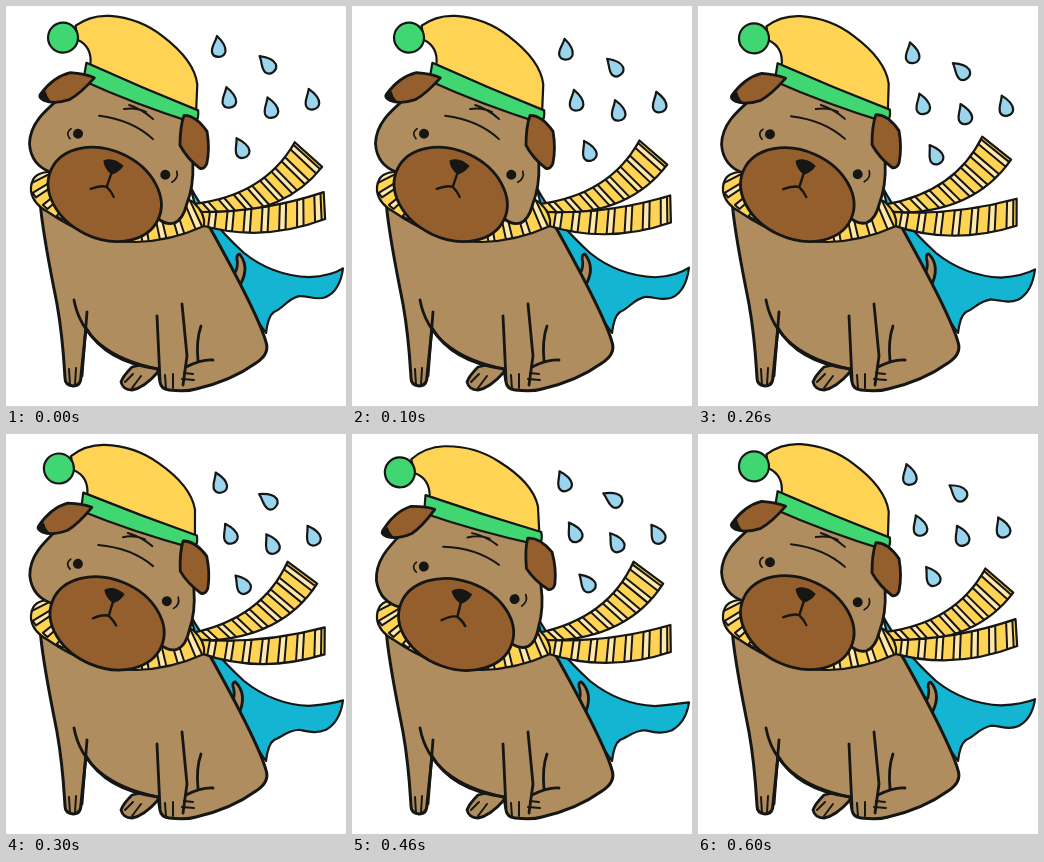
An HTML page with a canvas for the animation above (700 ms loop, 340 by 400 pixels).

```html
<!DOCTYPE html>
<html lang="en">
<head>
<meta charset="utf-8">
<title>Dog in the wind</title>
<style>
html, body { margin: 0; width: 100%; height: 100%; overflow: hidden; background: #fff; }
canvas { display: block; }
</style>
</head>
<body>
<canvas id="stage" width="340" height="400"></canvas>
<script>
const ctx = document.getElementById('stage').getContext('2d');
const INK = '#161614', FUR = '#b08d5e', BROWN = '#945f2d', YELLOW = '#ffd454',
  PALE = '#ffe8ac', GREEN = '#40d672', TEAL = '#14b5d2', WATER = '#9ad5ed';
const STEP = 100, STEPS = 7;

// Mean centre and tilt of each raindrop
const drops = [
  [213, 46.7, -9], [263, 63.6, -45], [223.5, 97.6, -14],
  [265.5, 107.7, -18], [306.5, 99.4, -17], [236.5, 147.9, -27]
];

// Swings between -1 and 1 once per loop, highest at the given step
const wave = (i, peak) => Math.cos((i - peak) * 2 * Math.PI / STEPS);

// Rises from 0 to 1 and back, slow at the bottom and quick at the peak
function nod(i, peak) {
  const gap = Math.abs(i - peak), near = Math.min(gap, STEPS - gap);
  return (1 - near / 3) ** 2;
}

function shape(d, fill, width = 2.8) {
  const path = new Path2D(d);
  if (fill) {
    ctx.fillStyle = fill;
    ctx.fill(path);
  }
  ctx.lineWidth = width;
  if (width) ctx.stroke(path);
}

function dot(x, y, r, fill, width = 0) {
  shape(`M${x - r} ${y}a${r} ${r} 0 1 0 ${2 * r} 0a${r} ${r} 0 1 0 ${-2 * r} 0Z`, fill, width);
}

function turned(deg, x, y, draw) {
  ctx.save();
  ctx.translate(x, y);
  ctx.rotate(deg * Math.PI / 180);
  ctx.translate(-x, -y);
  draw();
  ctx.restore();
}

// Point on a quadratic curve [x0, y0, cx, cy, x1, y1]
function at(c, t) {
  const u = 1 - t;
  return [0, 1].map(i => u * u * c[i] + 2 * u * t * c[i + 2] + t * t * c[i + 4]);
}

function stripes(a, b, count) {
  for (let k = 0; k < count; k++) {
    const t = (k + 0.45) / count, end = t + 0.36 / count;
    shape(`M${at(a, t)}L${at(b, t)}L${at(b, end)}L${at(a, end)}Z`, PALE, 2);
  }
}

function knit(outline, bands) {
  shape(outline, YELLOW, 0);
  ctx.save();
  ctx.clip(new Path2D(outline));
  for (const [a, b, count] of bands) stripes(a, b, count);
  ctx.restore();
  shape(outline, null, 2.2);
}

function scarfEnd(a, b, count) {
  const [x0, y0, cx, cy, x1, y1] = b;
  knit(`M${a[0]} ${a[1]}Q${a.slice(2)}L${x1} ${y1}Q${cx} ${cy} ${x0} ${y0}Z`, [[a, b, count]]);
}

function cape(i) {
  const y = 265 + 3.5 * wave(i, 4.3), s = 0.6 + 0.45 * wave(i, 3.7);
  shape(`M184 180C195 202 215 226 238 247C258 263 280 ${270 + s} 303 ${271 + s}
    Q325 270 337 ${y}Q334 ${284 + 4 * s} 320 ${290 + 6 * s}
    C310 ${294 + 6 * s} 303 ${288 + 10 * s} 293 ${289 + 7 * s}
    C280 ${293 + 4 * s} 278 302 268 306Q262 310 260 327L200 240Z`, TEAL, 2.2);
}

function tail(i) {
  turned(-1 - 4 * wave(i, 3.5), 228, 282, () =>
    shape('M216 272Q231 272 230 256Q228 248 232 248Q244 262 232 282Z', FUR));
}

function body() {
  shape('M126 361Q117 370 115 376Q117 384 126 384Q138 382 152 366L152 355Z', FUR);
  shape(`M34 194C36 225 44 262 51 298C57 332 58 356 59 372Q59 379 67 380Q75 380 75 370
    L80 322Q100 356 152 363L154 376Q155 383 163 384Q180 386 190 383
    Q225 375 250 357Q264 348 260 336Q252 308 203 220L120 190Z`, FUR, 3);
  shape(`M68 294Q78 348 152 363M81 306L76 370M151 310L154 374M176 298Q179 328 181 350L177 379
    M195 320Q190 334 192 355M207 354Q196 353 180 361`);
  shape(`M63 363L64 379M70 362L69 379M159 369L160 383M167 368L167 382
    M119 376L127 368M126 382L135 370M178 367L187 368M176 373L188 374`, null, 2);
}

function neckScarf() {
  knit(`M42 166Q24 167 25 185Q27 198 42 206Q85 236 130 236Q165 235 198 220
    Q200 208 187 196L120 160Z`, [
    [[18, 168, 30, 216, 128, 242], [62, 150, 72, 182, 120, 190], 7],
    [[112, 242, 155, 244, 202, 224], [106, 190, 148, 200, 184, 188], 5]
  ]);
}

function head() {
  shape(`M54 92C38 106 24 118 23.5 138Q25 160 46 167L100 215L152 212Q160 219 168 217
    Q177 214 181 198Q188 180 187 158L188 112L85 72Z`, FUR);
  shape('M93 110Q126 114 147 133M118 103Q130 101 140 106M123 99Q136 103 147 113', null, 2);
  shape('M65 123Q59 127 64 133M171 165Q173 172 166 176', null, 1.7);
  dot(72, 128, 5, INK);
  dot(159.5, 168.5, 5, INK);

  turned(25, 99, 188.5, () =>
    shape('M40 188.5a59 44 0 1 0 118 0a59 44 0 1 0 -118 0Z', BROWN));
  shape('M98 155Q107 151 117 160Q113 166 106 168Q99 163 98 155Z', INK, 1);
  shape('M106 166L101 181M85 183Q95 179 101 181Q106 186 108 191', null, 2.4);

  shape('M84 59Q86 41 71 34L69 20Q84 9 103 10Q133 12 156 30Q188 54 191 78L190 105Z', YELLOW, 2.2);
  shape('M80 57Q136 82 192 104Q193 112 189 117Q128 98 77 75Z', GREEN, 2.2);
  dot(56.5, 32, 15, GREEN, 2.2);

  shape('M34 89Q47 71 64 67Q79 68 88 72Q74 88 63 94Q48 99 38 95Q32 92 34 89Z', BROWN);
  shape('M34 90L39 86Q40 91 44 96Q36 95 34 90Z', INK, 1);
  shape('M178 109Q190 109 201 125Q204 142 201 157Q199 163 194 162Q181 152 174 139Q174 120 178 109Z', BROWN);
}

function rain(i) {
  const dx = -0.3 + 1.5 * wave(i, 2), dy = 4.2 * wave(i, 3), tilt = 9 * wave(i, 0.7);
  for (const [x, y, turn] of drops) {
    ctx.save();
    ctx.translate(x + dx, y + dy);
    turned(turn + tilt, 0, 0, () =>
      shape('M-1 -13C3 -9 8 -3 7 3C5 9.5 -5 9.5 -6.5 3C-7 -3 -3 -6 -1 -13Z', WATER, 2.2));
    ctx.restore();
  }
}

function draw(i) {
  ctx.fillStyle = '#fff';
  ctx.fillRect(0, 0, 340, 400);
  ctx.strokeStyle = INK;
  ctx.lineCap = ctx.lineJoin = 'round';
  rain(i);
  cape(i);
  tail(i);
  body();
  turned(-1.5 - 2.9 * wave(i, 3.5), 197, 207, () =>
    scarfEnd([188, 198, 258, 188, 287, 134], [197, 207, 276, 210, 315, 158], 8));
  turned(0.6 + 2 * wave(i, 2.7), 197, 207, () =>
    scarfEnd([196, 206, 258, 207, 318, 188], [194, 219, 255, 238, 319, 215], 7));
  neckScarf();
  turned(0.3 - 5.4 * nod(i, 4), 123, 132, head);
}

function tick() {
  draw(Math.floor(performance.now() / STEP) % STEPS);
  requestAnimationFrame(tick);
}
tick();
</script>
</body>
</html>
```
